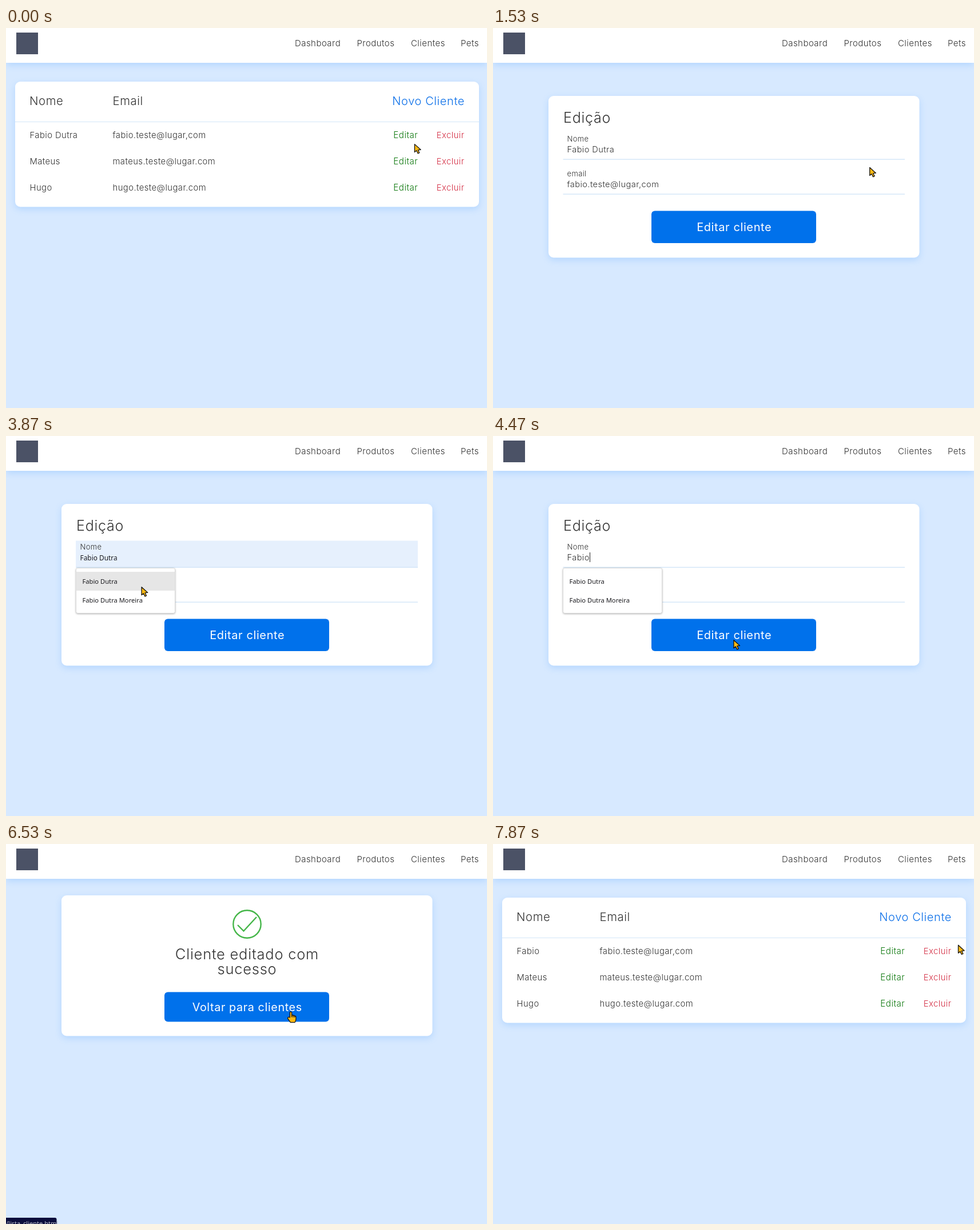
An HTML page that plays this animation: 841x666 px, repeating every 8000 ms.

```html
<!DOCTYPE html>
<html lang="pt">
<head>
<meta charset="utf-8">
<title>Clientes</title>
<style>
html, body { margin: 0; width: 100%; height: 100%; overflow: hidden; background: #d7e9ff; }
svg { display: block; width: 841px; height: 666px; }
text { font-family: Inter, sans-serif; font-weight: 300; letter-spacing: .03em; fill: #333; white-space: pre; }
.card { fill: #fff; filter: drop-shadow(0 4px 6px rgba(20, 132, 255, .18)); }
.rule { fill: #d3e6f8; }
.btn { fill: #0071eb; }
.btn + text { fill: #fff; font-weight: 400; text-anchor: middle; }
.sys { font-family: "Noto Sans", sans-serif; letter-spacing: 0; font-weight: 500; fill: #1b1b1f; }
.mid { text-anchor: middle; }
.end { text-anchor: end; }
.cursor { stroke: #141414; stroke-width: 1.3; stroke-linejoin: round; fill: #fdb913; }
</style>
</head>
<body>
<svg id="stage" viewBox="0 0 841 666" xmlns="http://www.w3.org/2000/svg"></svg>
<script>
const LOOP = 8000, STEP = 200 / 3;
const FULL = 'Fabio Dutra', FIRST = 'Fabio', MAIL = 'fabio.teste@lugar,com';
const ITEMS = [FULL, 'Fabio Dutra Moreira'];

const text = (x, y, size, str, attr = '') =>
  `<text x="${x}" y="${y}" font-size="${size}" ${attr}>${str}</text>`;
const box = (x, y, w, h, cls, r = 0, attr = '') =>
  `<rect x="${x}" y="${y}" width="${w}" height="${h}" rx="${r}" class="${cls}" ${attr}/>`;
const button = (y, h, size, str) =>
  box(277, y, 288, h, 'btn', 6) + text(421.7, y + h / 2 + 7.3, size, str);

const row = ([name, mail], i) => {
  const y = 193 + i * 46;
  return text(41.5, y, 14.8, name, i ? '' : 'id="rowName"') + text(186.5, y, 14.8, mail) +
    text(677.3, y, 15.2, 'Editar', 'style="fill:#0a760a"') +
    text(801.5, y, 14.8, 'Excluir', 'class="end" style="fill:#d42f45"');
};

const header = box(0, -10, 841, 71, 'card') + box(18, 8, 38, 38, '', 0, 'fill="#4b5266"') +
  [[505, 'Dashboard'], [613.5, 'Produtos'], [708, 'Clientes'], [795, 'Pets']]
    .map(([x, s]) => text(x, 32, 15, s)).join('');

const list = box(16, 94, 811, 219.5, 'card', 9) + box(16, 164, 811, 1, 'rule') +
  text(41, 135, 20.3, 'Nome') + text(186.5, 135, 20.3, 'Email') +
  text(802, 135, 20, 'Novo Cliente', 'class="end" style="fill:#0b6fe8"') +
  `<g id="rows">${[[FULL, MAIL], ['Mateus', 'mateus.teste@lugar.com'],
    ['Hugo', 'hugo.teste@lugar.com']].map(row).join('')}</g>`;

const edit = box(97, 119, 648.5, 283.5, 'card', 9) + text(123, 165.5, 25, 'Edição') +
  box(122, 183.5, 598, 47, '', 0, 'id="fill" fill="#e6f0fd"') +
  box(122.5, 229.5, 597.5, 1.4, 'rule') + box(122.5, 290.5, 597.5, 1.4, 'rule') +
  text(129.5, 219, 18.5, 'Nome', 'id="lab0"') + text(129.5, 280, 18.5, 'email', 'id="lab1"') +
  box(129.5, 204, 0, 17, '', 0, 'id="sel" fill="#0078d7"') +
  text(129.5, 218, 14.6, '', 'id="name"') +
  text(129.5, 217.5, 11.9, '', 'id="preview" class="sys" style="font-weight:400"') +
  text(129.5, 279, 14.6, MAIL, 'id="mail"') +
  box(0, 204, 1, 17, '', 0, 'id="caret" fill="#222"') +
  button(320.5, 56.5, 20, 'Editar cliente') +
  '<g id="drop">' +
  box(122.5, 231.5, 173, 79, '', 3, 'fill="#fff" stroke="#d9d9d9" style="filter:drop-shadow(0 1px 1.5px rgba(0,0,0,.3))"') +
  box(122.5, 238, 173, 33, '', 0, 'id="hover" fill="#e6e6e6"') +
  ITEMS.map((s, i) => text(133.5, 259 + 32.5 * i, 11.2, s, 'class="sys"')).join('') + '</g>';

const done = box(97, 90, 648.5, 246.5, 'card', 9) +
  '<g fill="none" stroke="#45b649" stroke-width="2.4"><circle cx="421.5" cy="140.5" r="24.2"/>' +
  '<path d="M405 142l10.5 10.5L438 128"/></g>' +
  text(421.5, 201.5, 25.5, 'Cliente editado com', 'class="mid"') +
  text(421.5, 227.5, 25.5, 'sucesso', 'class="mid"') +
  button(259.5, 52, 19.8, 'Voltar para clientes');

const status = '<g id="status">' + box(-6, 655, 0, 20, '', 3, 'id="bar" fill="#0a0d3c"') +
  text(0, 668.5, 11, '', 'id="url" class="sys" style="fill:#b9bccb;font-weight:400"') + '</g>';

// each pointer is drawn around its own hot spot
const cursors = '<g id="cursor" class="cursor">' +
  '<path id="arrow" d="M.5 .7V14.7L3.8 11.9L6.3 17L8.9 15.8L6.5 10.9L11.2 10.4Z"/>' +
  '<path id="hand" d="M-1.6 10V1.6Q-1.6 0 0 0Q1.6 0 1.6 1.6V6Q3.4 5.2 4.2 6.6Q6 5.9 6.7 7.4Q9 7 9 9.4V13Q9 16 7 18.6H-.6Q-2.6 16 -5.4 11.8Q-5.6 9.2 -3.4 9.4Z M1.6 6V9.5M4.2 6.6V9.8M6.7 7.4V10"/>' +
  '<path id="beam" fill="#8a6a1c" d="M-4.6 -8H4.6V-5.4H1.5V5.4H4.6V8H-4.6V5.4H-1.5V-5.4H-4.6Z"/></g>';

const group = (id, body) => `<g id="${id}">${body}</g>`;
document.getElementById('stage').innerHTML = header + group('list', list) +
  group('edit', edit) + group('done', done) + status + cursors;

const el = {};
document.querySelectorAll('[id]').forEach(e => el[e.id] = e);
const show = (id, on) => el[id].style.display = on ? '' : 'none';
const set = (id, attrs) => { for (const k in attrs) el[id].setAttribute(k, attrs[k]); };
const within = (t, a, b) => t >= a && t < b;
const part = (t, a, b) => Math.min(1, Math.max(0, (t - a) / (b - a)));
const ease = p => p * p * (3 - 2 * p);

// time, x, y
const PATH = [
  [0, 714, 203], [70, 713, 202], [530, 699, 185], [1400, 699, 185], [1600, 640, 270],
  [1800, 540, 354], [2000, 400, 300], [2230, 261, 214.5], [2800, 261, 214.5],
  [3000, 196, 222], [3130, 196, 222], [3200, 184, 225], [3460, 184, 225], [3530, 184, 226],
  [3600, 184, 226], [3740, 205, 245], [3870, 236, 264], [4070, 304, 272], [4470, 420, 357],
  [4930, 529, 377], [5330, 503, 354], [5940, 503, 354], [6530, 498, 294],
  [7400, 498, 294], [7870, 813, 176.5], [LOOP, 813, 176.5]
];

function pointer(t) {
  const i = Math.max(1, PATH.findIndex(k => k[0] > t));
  const [a, b] = [PATH[i - 1], PATH[i]], p = part(t, a[0], b[0]);
  return [a[1] + (b[1] - a[1]) * p, a[2] + (b[2] - a[2]) * p];
}

function drawField(t, x, y, open) {
  const loaded = t >= 1000, up = ease(part(t, 940, 1330));
  ['lab0', 'lab1'].forEach((id, i) =>
    set(id, { y: 219 + 61 * i - 20.5 * up, 'font-size': 18.5 - 5.5 * up }));

  const inside = open && within(x, 122, 296) && within(y, 238, 303);
  const item = inside ? Math.floor((y - 238) / 32.7) : -1;
  show('hover', inside);
  show('fill', inside);
  el.hover.setAttribute('y', 238 + 32.5 * Math.max(0, item));
  el.preview.textContent = inside ? ITEMS[item] : '';

  const value = !loaded || inside ? '' : t < 3870 ? FULL : FIRST;
  const from = within(t, 2200, 2330) ? 0 : within(t, 2930, 3200) ? 8 : within(t, 3200, 3740) ? 7 : -1;
  const picked = from >= 0 && value === FULL;
  el.name.innerHTML = picked ?
    value.slice(0, from) + `<tspan style="fill:#fff">${value.slice(from)}</tspan>` : value;
  show('mail', loaded);

  const width = value ? el.name.getComputedTextLength() : 0;
  const start = picked && from ? el.name.getSubStringLength(0, from) : 0;
  show('sel', picked);
  set('sel', { x: 129.5 + start, width: width - start });
  show('caret', open && value && !picked);
  set('caret', { x: Math.round(129.5 + width) });
}

function draw(ms) {
  const t = Math.floor((ms % LOOP + 5) / STEP) * STEP + 5;
  const [x, y] = pointer(t);
  const page = within(t, 730, 5600) ? 'edit' : within(t, 5600, 6800) ? 'done' : 'list';
  ['list', 'edit', 'done'].forEach(id => show(id, id === page));

  show('rows', !within(t, 6800, 6870));
  el.rowName.textContent = t < 730 ? FULL : FIRST;

  const open = within(t, 2200, 4600);
  show('drop', open);
  if (page === 'edit') drawField(t, x, y, open);

  const early = t < 4000;
  show('status', within(t, 230, 1200) || within(t, 6380, 7270));
  el.status.style.opacity = 1 - (early ? part(t, 1000, 1200) : part(t, 7010, 7200));
  set('bar', { width: early ? 126 : 94.5 });
  el.url.textContent = early ? '/edita_cliente.html?id=2' : '/lista_cliente.html';

  const overField = page === 'edit' && within(x, 122, 720) &&
    (within(y, 184, 231) || within(y, 245, 292)) && !(open && x < 296 && y > 231);
  const shape = within(t, 230, 1470) || within(t, 6380, 7470) ? 'hand' : overField ? 'beam' : 'arrow';
  ['arrow', 'hand', 'beam'].forEach(id => show(id, id === shape));
  show('cursor', !within(t, 2530, 2860));
  set('cursor', { transform: `translate(${x} ${y})` });
}

const begin = performance.now();
function tick() {
  draw(performance.now() - begin);
  requestAnimationFrame(tick);
}
tick();
</script>
</body>
</html>
```
